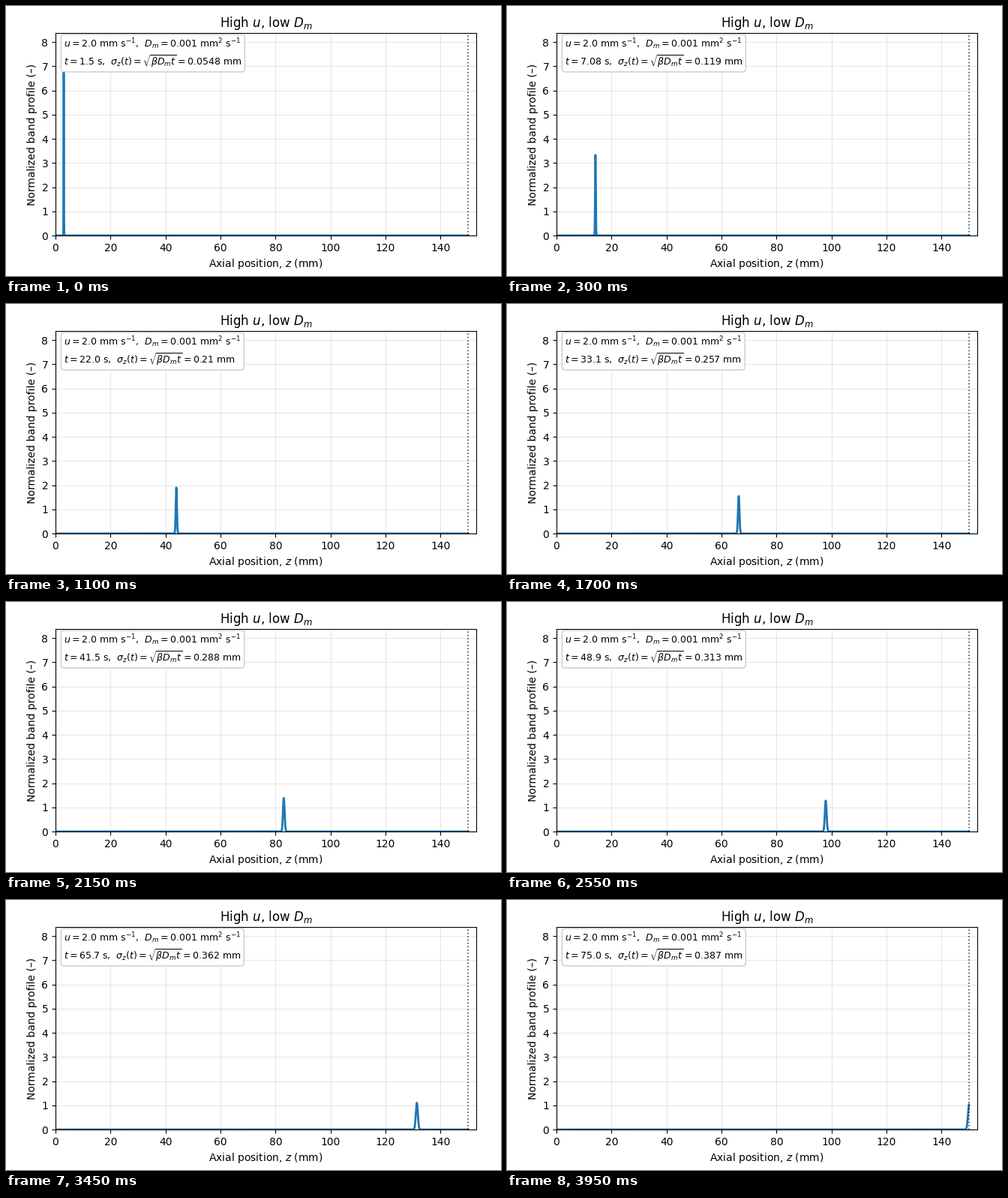
These frames come from a looping animation (660 by 360 pixels, 4 s). A matplotlib script:

```python
import matplotlib.pyplot as plt
import numpy as np
from matplotlib.animation import FuncAnimation

FRAMES, INTERVAL = 80, 50
LENGTH = 150.0            # column length, mm
U, DM, BETA = 2.0, 0.001, 2.0

z = np.linspace(0, LENGTH, 4000)
times = np.linspace(1.5, LENGTH / U, FRAMES)


def sig3(x):
    """Three significant digits, always with a decimal point."""
    return str(float(f"{x:.3g}"))


def sigma(t):
    return np.sqrt(BETA * DM * t)


def band(t):
    s = sigma(t)
    return np.exp(-0.5 * ((z - U * t) / s) ** 2) / (s * np.sqrt(2 * np.pi))


def caption(t):
    return (
        rf"$u={sig3(U)}\ \mathrm{{mm\ s^{{-1}}}}$,  "
        rf"$D_m={sig3(DM)}\ \mathrm{{mm^2\ s^{{-1}}}}$" "\n"
        rf"$t={sig3(t)}\ \mathrm{{s}}$,  "
        rf"$\sigma_z(t)=\sqrt{{\beta D_m t}}={sig3(sigma(t))}\ \mathrm{{mm}}$"
    )


fig, ax = plt.subplots(figsize=(6.6, 3.6), dpi=100)
fig.subplots_adjust(left=0.10, right=0.95, bottom=0.15, top=0.90)

line, = ax.plot(z, band(times[0]), lw=2)
ax.axvline(LENGTH, color="k", ls=":", lw=1.2, alpha=0.7)
ax.set_xlim(0, 1.02 * LENGTH)
ax.set_ylim(0, 1.15 / (sigma(times[0]) * np.sqrt(2 * np.pi)))
ax.set_title("High $u$, low $D_m$")
ax.set_xlabel("Axial position, $z$ (mm)")
ax.set_ylabel("Normalized band profile (–)")
ax.grid(True, alpha=0.3)

info = ax.text(
    0.02, 0.98, caption(times[0]), transform=ax.transAxes,
    ha="left", va="top", fontsize=9,
    bbox=dict(boxstyle="round,pad=0.3", facecolor="white", edgecolor="0.8"),
)


def update(i):
    line.set_ydata(band(times[i]))
    info.set_text(caption(times[i]))
    return line, info


anim = FuncAnimation(fig, update, frames=FRAMES, interval=INTERVAL,
                     repeat=True, repeat_delay=0)
plt.show()
```
